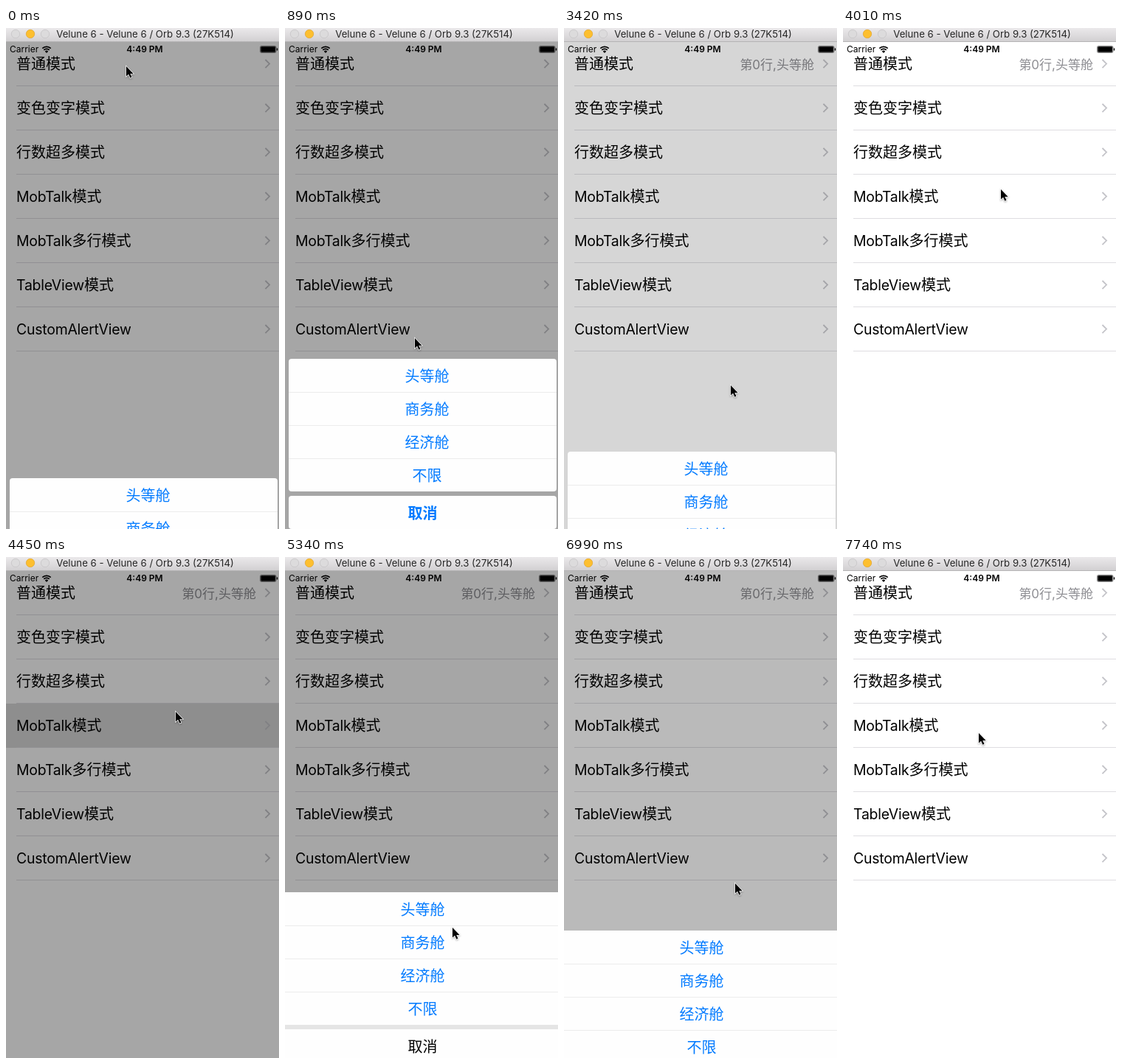
Write an HTML page that moves like this. It is 370x680 px and loops after 8 s.

```html
<!DOCTYPE html>
<html lang="zh-CN">
<head>
<meta charset="utf-8">
<title>Action sheets</title>
<style>
html, body { margin: 0; width: 100%; height: 100%; overflow: hidden; background: #fff; }
svg { display: block; width: 370px; height: 680px; }
text { font: 20px Inter, "Noto Sans CJK SC", "Noto Sans CJK", sans-serif; white-space: pre; }
.latin { font-size: 19.4px; letter-spacing: -.2px; }
.mid { text-anchor: middle; }
.blue { fill: #007aff; }
.bold { font-weight: 700; }
#cursor { filter: drop-shadow(0 1px 1px #0005); }
</style>
</head>
<body>
<svg id="stage" viewBox="0 0 370 680"></svg>
<script>
const TICK = 148.6, LOOP = 8000, SHEET_H = 231;
const rows = ['普通模式', '变色变字模式', '行数超多模式', 'MobTalk模式',
  'MobTalk多行模式', 'TableView模式', 'CustomAlertView'];
const options = ['头等舱', '商务舱', '经济舱', '不限'];

const rect = (x, y, w, h, fill, more = '') =>
  `<rect x="${x}" y="${y}" width="${w}" height="${h}" fill="${fill}" ${more}/>`;
const text = (x, y, s, more = '') => `<text x="${x}" y="${y}" ${more}>${s}</text>`;
const light = (x, fill, edge) =>
  `<circle cx="${x}" cy="8" r="5.7" fill="${fill}" stroke="${edge}" stroke-width=".7"/>`;

function row(label, i) {
  const y = 60 * i;
  const mixed = label.replace(/[A-Za-z]+/, '<tspan class="latin">$&</tspan>');
  return text(14, y + 56, mixed) + rect(14, y + 78, 356, 1, '#dedde1') +
    `<path d="M351.5 ${y + 43}l5.6 5.6l-5.6 5.6" fill="none" stroke="#c4c4c9" stroke-width="1.8"/>`;
}

function sheet(id, x, w, radius, cx, cancelClass, gap) {
  const corner = `rx="${radius}"`;
  return `<g id="${id}">` + (gap ? rect(x, 180, w, 6, gap) : '') +
    rect(x, 0, w, 180, '#fefefe', corner) + rect(x, 186, w, 45, '#fefefe', corner) +
    options.map((s, i) => text(cx, 45 * i + 31, s, 'class="mid blue"') +
      (i ? rect(x, 45 * i, w, 1, '#ececec') : '')).join('') +
    text(186.5, 217, '取消', `class="mid ${cancelClass}"`) + '</g>';
}

const statusBar = text(5, 33, 'Carrier', 'style="font-size:12px"') +
  `<g fill="none" stroke="#000" stroke-width="1.7">
    <path d="M49.3 27.6a8.2 8.2 0 0 1 11.4 0M51.3 29.9a5.3 5.3 0 0 1 7.4 0"/></g>
  <path d="M55 34l-2.2-2.3a3.1 3.1 0 0 1 4.4 0z"/>` +
  text(188, 33, '4:49 PM', 'class="mid" style="font-size:12px;font-weight:600"') +
  rect(344.5, 24.5, 21.5, 9, 'none', 'rx="1.8" stroke="#000" stroke-width=".5"') +
  rect(345.3, 25.3, 19.9, 7.4, '#000', 'rx="1"') + rect(366.8, 27.3, 1.4, 3.4, '#000', 'rx=".7"');

const titleBar = rect(0, 0, 370, 18, 'url(#bar)') + rect(0, 18, 370, 1, '#b5b4b5') +
  light(13, '#dcdbdc', '#c3c2c3') + light(33, '#fdbf2f', '#e0a32a') + light(53, '#dcdbdc', '#c3c2c3') +
  text(188.5, 13, 'Velune 6 - Velune 6 / Orb 9.3 (27K514)',
    'class="mid" fill="#262626" style="font-size:13.2px"');

const stage = document.getElementById('stage');
stage.innerHTML = `<defs><linearGradient id="bar" x2="0" y2="1">
    <stop stop-color="#ebe9eb"/><stop offset="1" stop-color="#d2d0d2"/></linearGradient></defs>` +
  rect(0, 0, 370, 680, '#fff') +
  rect(0, 199, 370, 60, '#d9d9d9', 'id="picked"') +
  rows.map(row).join('') +
  text(339, 56, '第0行,头等舱', 'id="detail" text-anchor="end" fill="#8e8e93" style="font-size:17px"') +
  statusBar + rect(0, 19, 370, 661, '#000', 'id="dim"') +
  sheet('rounded', 5, 363, 4, 192.5, 'blue bold') +
  sheet('flat', 0, 370, 0, 186.5, '', '#e5e5e5') +
  titleBar +
  `<path id="cursor" d="M0 0V13.6L3.1 10.8L5.4 15.8L7.5 14.8L5.3 9.9H9.6Z"
    stroke="#fff" stroke-width="1.4" paint-order="stroke"/>`;

const $ = id => document.getElementById(id);
const clamp = u => Math.max(0, Math.min(1, u));
const ease = u => (u = clamp(u), u * u * (3 - 2 * u));

// cursor stops: tick, x, y
const path = [
  [0, 163, 52], [3, 163, 52], [5, 171, 290], [7, 181, 551], [8, 181, 551], [16, 226, 485],
  [23, 226, 485], [25, 197, 227], [26, 197, 227], [28, 230, 210], [33, 230, 210],
  [34, 234, 472], [35, 234, 472], [36, 227, 503], [37, 222, 520], [38, 221, 511],
  [41, 229, 446], [44, 229, 446], [45, 232, 443], [49, 232, 443], [52, 184, 239], [60, 184, 239]
];

function cursorAt(n) {
  const i = path.findIndex(p => p[0] > n);
  const [a, x, y] = path[i - 1], [b, x2, y2] = path[i];
  const u = (n - a) / (b - a);
  return [x + (x2 - x) * u, y + (y2 - y) * u].map(Math.round);
}

// moves a sheet and returns how strongly it dims the screen
function slide(id, top, n, open, close) {
  const gone = ease((n - close) / 2);
  const shown = ease((n - open) / 2) - gone;
  $(id).setAttribute('transform', `translate(0 ${Math.round(top + SHEET_H * (1 - shown))})`);
  return n < open ? 0 : 1 - gone;
}

function draw() {
  // the screen refreshes in even ticks
  const n = Math.floor((performance.now() % LOOP + 16) / TICK);
  const dim = slide('rounded', 449, n, -.724, 21.94) + slide('flat', 455, n, 30, 46.386);
  $('dim').setAttribute('opacity', .35 * dim);
  $('detail').setAttribute('opacity', n >= 22 ? 1 : 0);
  $('picked').setAttribute('opacity', n >= 30 ? clamp((32 - n) / 2) : 0);
  $('cursor').setAttribute('transform', `translate(${cursorAt(n)})`);
  requestAnimationFrame(draw);
}
draw();
</script>
</body>
</html>
```
